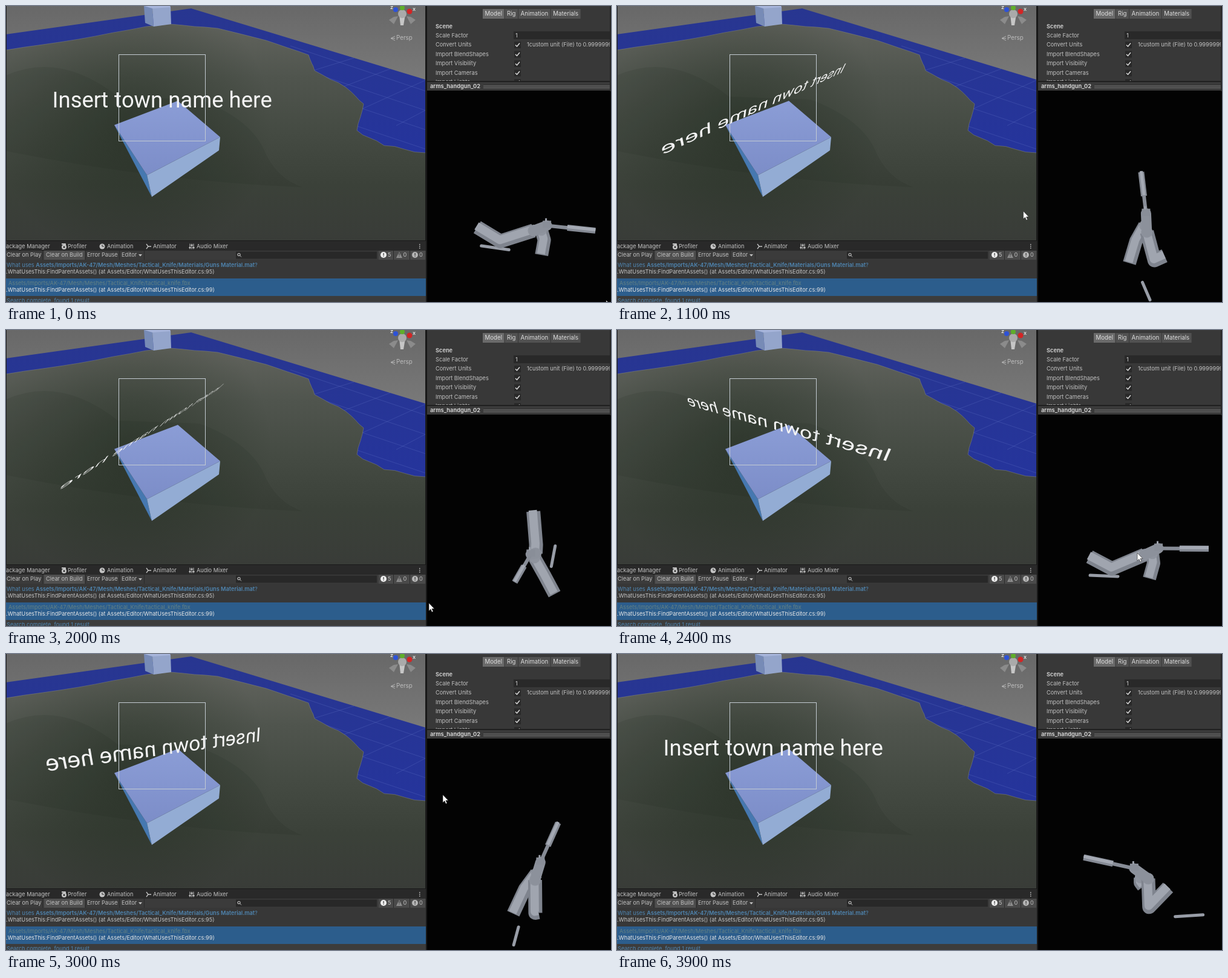
Animation, 1000 px wide and 490 px high, one loop 4 s. Source, as an HTML page with a canvas:

```html
<!DOCTYPE html>
<html lang="en">
<head>
<meta charset="utf-8">
<title>Editor with rotating label</title>
<style>
html, body { margin: 0; width: 100%; height: 100%; overflow: hidden; background: #191919; }
canvas { display: block; width: 100vw; height: 100vh; }
</style>
</head>
<body>
<canvas id="stage" width="1000" height="490"></canvas>
<script>
const W = 1000, H = 490, LOOP = 4000, STEP = 100;
const ctx = document.getElementById('stage').getContext('2d');
const backdrop = document.createElement('canvas');
backdrop.width = W;
backdrop.height = H;
let g = backdrop.getContext('2d');

const mix = (a, b, k) => a + (b - a) * k;
const mixAll = (a, b, k) => a.map((v, i) => mix(v, b[i], k));
const rad = deg => deg * Math.PI / 180;

// ---------- drawing helpers ----------
function rect(x, y, w, h, color) {
  g.fillStyle = color;
  g.fillRect(x, y, w, h);
}

function trace(pts) {
  g.beginPath();
  for (let i = 0; i < pts.length; i += 2) g.lineTo(pts[i], pts[i + 1]);
}

function poly(pts, color) {
  trace(pts);
  g.closePath();
  g.fillStyle = color;
  g.fill();
}

function line(pts, color, width = 1, cap = 'butt') {
  trace(pts);
  g.strokeStyle = color;
  g.lineWidth = width;
  g.lineCap = cap;
  g.lineJoin = 'round';
  g.stroke();
}

function dot(x, y, r, color) {
  g.beginPath();
  g.arc(x, y, r, 0, 7);
  g.fillStyle = color;
  g.fill();
}

function clipped(x, y, w, h, draw) {
  g.save();
  g.beginPath();
  g.rect(x, y, w, h);
  g.clip();
  draw();
  g.restore();
}

function label(text, x, y, color = '#c2c2c2', size = 9.2, weight = 400) {
  g.font = `${weight} ${size}px Inter, sans-serif`;
  g.textBaseline = 'middle';
  g.fillStyle = color;
  g.fillText(text, x, y);
  return x + g.measureText(text).width;
}

function gradient(y0, y1, ...colors) {
  const fill = g.createLinearGradient(0, y0, 0, y1);
  colors.forEach((c, i) => fill.addColorStop(i / (colors.length - 1), c));
  return fill;
}

let seed = 7;
function random() {
  seed = seed * 16807 % 2147483647;
  return seed / 2147483647 - 0.5;
}

// Splits each edge into short pieces with a little seeded jitter.
function rough(pts, amount) {
  const out = [];
  for (let i = 0; i + 3 < pts.length; i += 2)
    for (let k = 0; k < 1; k += 0.25) {
      const j = k ? amount : 0;
      out.push(mix(pts[i], pts[i + 2], k) + random() * j, mix(pts[i + 1], pts[i + 3], k) + random() * j);
    }
  return [...out, ...pts.slice(-2)];
}

// ---------- still parts ----------
function drawGizmo() {
  for (const side of [-1, 1])
    poly([655 + side * 7, 17, 655 + side * 14, 18, 655 + side * 22, 23, 655 + side * 14, 30], '#8b8b8b');
  poly([650, 14, 660, 14, 657, 32, 652, 32], '#c6c6c6');
  dot(655, 13, 7, '#aaaaaa');
  dot(655, 3, 4, '#5fae2a');
  dot(644, 6, 4, '#2d52d8');
  dot(667, 9, 4.5, '#d32525');
  label('z', 635, 2, '#e0e0e0', 9, 600);
  label('x', 672, 5, '#e0e0e0', 9, 600);
  line([643, 50, 636, 53.5, 643, 57], '#b4b4b4');
  line([636, 53.5, 643, 53.5], '#b4b4b4');
  label('Persp', 645, 53.5, '#bdbdbd', 9.8);
}

function drawWater() {
  poly([0, 47, 306, 4, 694, 122, 694, 250, 0, 90], gradient(0, 245, '#283690', '#25349c'));
  for (let i = 0; i < 5; i++) {
    const y = 66 + i * 32, x = 575 + i * 60;
    line([470, y, 694, y + 75], 'rgba(105,125,205,.35)', 0.8);
    line([x, 86 + i * 18, x - 110, 120 + i * 26], 'rgba(105,125,205,.35)', 0.8);
  }
}

function drawLand() {
  const shore = [
    ...rough([0, 73, 120, 55, 232, 34, 272, 30, 350, 37, 430, 57, 500, 81], 1),
    ...rough([500, 81, 510, 107, 562, 135, 591, 162, 580, 206, 625, 231, 694, 243], 4)
  ];
  const land = [...shore, 694, 388, 0, 388];
  poly(land, gradient(25, 388, '#62645e', '#50554e', '#454b43', '#3b4139', '#393c38'));
  line(shore, 'rgba(145,145,125,.45)');
  g.save();
  trace(land);
  g.clip();
  const shade = g.createRadialGradient(210, 195, 20, 210, 195, 230);
  shade.addColorStop(0, 'rgba(22,34,20,.4)');
  shade.addColorStop(1, 'rgba(22,34,20,0)');
  rect(0, 25, 694, 363, shade);
  g.beginPath();
  g.moveTo(320, 155);
  g.quadraticCurveTo(400, 185, 425, 235);
  g.quadraticCurveTo(445, 285, 490, 300);
  g.quadraticCurveTo(250, 290, 0, 240);
  g.lineTo(0, 115);
  g.quadraticCurveTo(90, 75, 185, 150);
  g.fillStyle = 'rgba(25,35,22,.1)';
  g.fill();
  g.restore();
}

function drawScene() {
  rect(0, 0, 694, 388, gradient(0, 130, '#686868', '#7a7a7a'));
  drawWater();
  drawLand();
  poly([228, 0, 242, 3, 244, 34, 230, 28], '#778bb6');
  poly([242, 3, 272, 1, 273, 30, 244, 34], '#94a5cb');
  poly([228, 0, 271, 0, 272, 2, 242, 4], '#a7b5db');

  poly([179, 197, 233, 280, 241, 316], '#4678b0');
  poly([233, 280, 354, 217, 352, 239, 241, 316], '#93acd4');
  poly([179, 197, 284, 157, 354, 217, 233, 280], gradient(157, 280, '#8b9dd6', '#7c8dc8'));
  drawGizmo();
}

function alertBadge(x, count, color) {
  dot(x, 412, 5, color);
  label('!', x - 1.3, 412.5, '#333333', 8, 700);
  label(count, x + 7, 412.5);
}

function drawTabs() {
  rect(0, 389, 694, 16, '#292929');
  label('ackage Manager', 0, 398);
  line([92, 394, 98, 394, 98, 400], '#c4c4c4', 2);
  dot(96, 399, 4, '#c4c4c4');
  dot(96, 399, 1.5, '#292929');
  label('Profiler', 102, 398);
  dot(159, 398, 4.5, '#c4c4c4');
  line([159, 395, 159, 398, 162, 398], '#292929');
  label('Animation', 167, 398);
  line([232, 394, 235, 398, 240, 398], '#c4c4c4', 1.3);
  line([232, 402, 235, 398], '#c4c4c4', 1.3);
  label('Animator', 243, 398);
  for (let i = 0; i < 3; i++) {
    const x = 304 + i * 3, y = i === 1 ? 396 : 400;
    line([x, 393.5, x, 402.5], '#c4c4c4');
    line([x - 1.5, y, x + 1.5, y], '#c4c4c4', 2);
    rect(683, 394 + i * 3, 1.5, 1.5, '#c4c4c4');
  }
  label('Audio Mixer', 315, 398);
}

function drawToolbar() {
  rect(0, 405, 694, 15, '#3b3b3b');
  rect(63, 405, 67, 15, '#505050');
  label('Clear on Play', 1, 412.5);
  label('Clear on Build', 66, 412.5);
  label('Error Pause', 134, 412.5);
  label('Editor', 191, 412.5);
  poly([219, 411, 225, 411, 222, 414.5], '#c2c2c2');
  rect(380, 406.5, 233, 12, '#282828');
  dot(385, 411.5, 2.6, '#c4c4c4');
  dot(385, 411.5, 1.5, '#282828');
  line([386.5, 413, 389, 415.5], '#c4c4c4');
  rect(616, 405, 77, 15, '#4a4a4a');
  for (const x of [60, 131, 187, 228, 640, 667]) rect(x, 405, 1, 15, '#2b2b2b');
  alertBadge(624, '5', '#eeeeee');
  poly([650, 407, 655, 417, 645, 417], '#8d8d8d');
  label('!', 648.8, 413, '#333333', 7, 700);
  label('0', 656.5, 412.5);
  alertBadge(676, '0', '#b5b5b5');
}

function drawLog() {
  const blue = '#4f86b2';
  const caller = '.WhatUsesThis:FindParentAssets() (at Assets/Editor/WhatUsesThisEditor.cs:';
  const root = 'Assets/Imports/AK-47/Mesh/Meshes/Tactical_Knife/';
  rect(0, 420, 694, 31, '#373737');
  const x = label('What uses ', 1, 429, blue);
  const end = label(root + 'Materials/Guns Material.mat', x, 429, blue, 9.2, 600);
  label('?', end, 429, blue);
  label(caller + '95)', 0, 440.5, '#c4c4c4');
  rect(0, 451, 694, 29, '#2c5d8c');
  label(root + 'tactical_knife.fbx', 4, 459, '#648183');
  label(caller + '99)', 0, 470.5, '#e6e6e6');
  rect(0, 480, 694, 10, '#3c3c3c');
  label('Search complete, found 1 result.', 1, 488, blue);
}

function drawInspector() {
  rect(696, 0, 304, 141, '#383838');
  let x = 788;
  for (const name of ['Model', 'Rig', 'Animation', 'Materials']) {
    g.font = '400 9.7px Inter, sans-serif';
    const w = g.measureText(name).width + 7;
    rect(x, 5, w, 16, x === 788 ? '#6a6a6a' : '#515151');
    label(name, x + 3.5, 13.5, '#dedede', 9.7);
    x += w + 1;
  }
  label('Scene', 710, 34, '#c8c8c8', 9.2, 700);
  rect(839, 42, 161, 13, '#292929');
  label('1', 842, 49, '#d0d0d0');
  label('Scale Factor', 710, 49);
  clipped(696, 0, 304, 125, () => {
    const rows = ['Convert Units', 'Import BlendShapes', 'Import Visibility', 'Import Cameras', 'Import Lights'];
    rows.forEach((name, i) => {
      const y = 64.5 + i * 15.5;
      label(name, 710, y);
      rect(840, y - 5.5, 11, 11, '#292929');
      line([842, y, 844.5, y + 2.5, 849, y - 3], '#d8d8d8', 1.5);
    });
    label('1custom unit (File) to 0.9999999', 861, 64.5);
  });
  rect(696, 124, 304, 2, '#202020');
  rect(696, 126, 304, 15, '#3a3a3a');
  label('arms_handgun_02', 701, 133.5, '#d0d0d0', 9.2, 700);
  rect(789, 132, 209, 1, '#777777');
  rect(789, 135, 209, 1, '#777777');
  rect(696, 140, 304, 350, '#030303');
  rect(998, 0, 2, 141, '#242424');
}

rect(0, 0, W, H, '#191919');
clipped(1, 0, 692, 388, drawScene);
drawTabs();
drawToolbar();
drawLog();
drawInspector();
g = ctx;

// ---------- motion ----------
// Each key: time, label turn and lean, model yaw, pointer x and y.
const keys = [
  [0, 0, 36, 8, 992, 487],
  [800, 177, 0, -50, 765, 352],
  [1500, 97, 36, -180, 547, 323],
  [2000, 133, 34, -262, 699, 452],
  [2400, 205, 8, -360, 860, 369],
  [3000, 167, -18, -440, 722, 233],
  [3900, 0, 36, -542, 1010, 495]
];

function stateAt(t) {
  const i = Math.max(1, keys.findIndex(k => k[0] >= t));
  const a = keys[i - 1], b = keys[i];
  const [, turn, lean, yaw, x, y] = mixAll(a, b, (t - a[0]) / (b[0] - a[0]));
  return { turn: rad(turn), lean: rad(lean), yaw: rad(yaw), x, y };
}

function limb(pts, width) {
  const p = pts.flat();
  line(p, '#7f848e', width);
  line(p.map((v, i) => v - (i % 2 ? 2 : 1)), '#a0a5af', width * 0.6);
  dot(...pts[2], width * 0.42, '#8f949e');
}

// Points are [right, screen height, towards the viewer] around the model's axis.
function drawArms(yaw) {
  const c = Math.cos(yaw), s = Math.sin(yaw);
  const fold = Math.max(0, -c);
  const turn = ([x, y, z]) => [875 + x * c - z * s, y + 0.7 * (x * s + z * c)];
  const bend = (open, folded) => turn(mixAll(open, folded, fold));
  const hand = turn([-3, 372, 0]);
  const rear = turn([20, 358, 5]);
  const muzzle = turn([103, 348, 20]);
  const neck = mixAll(rear, muzzle, 0.42);

  line([...turn([-93, 420, -20]), ...turn([-47, 422, -20])], '#989da7', 5, 'round');
  limb([bend([5, 438, -38], [5, 385, 0]), bend([12, 400, -20], [10, 378, 0]), turn([10, 370, 0])], 22);
  limb([bend([-94, 360, 22], [-35, 370, -25]), bend([-57, 388, 10], [-4, 405, -20]), hand], 23);
  line([...hand, ...rear], '#8c919b', 17, 'round');
  line([...rear, ...muzzle], '#878c96', 6);
  line([...neck, ...muzzle], '#858a94', 10);
  line([neck[0], neck[1] - 1.5, muzzle[0], muzzle[1] - 1.5], '#a5aab4', 5);
  rect(rear[0] - 7, rear[1] - 8, 14, 12, '#898e98');
  rect(rear[0] - 3, rear[1] - 12, 3, 5, '#9da2ac');
}

// Turns the text in space and draws it letter by letter in perspective.
function drawTitle(turn, lean) {
  const text = 'Insert town name here';
  const pitch = rad(36), c = Math.cos(turn), s = Math.sin(turn);
  const project = (x, h) => {
    const rise = h * Math.cos(lean), back = h * Math.sin(lean);
    const ground = x * s - back * c;
    const depth = ground * Math.cos(pitch) + rise * Math.sin(pitch);
    const zoom = 1 / (1 - depth * 0.0025);
    return [258 + zoom * (x * c + back * s),
      155 + zoom * (ground * Math.sin(pitch) - rise * Math.cos(pitch))];
  };
  g.font = '400 36.5px Roboto, sans-serif';
  g.textBaseline = 'alphabetic';
  g.fillStyle = '#f4f4f4';
  const half = g.measureText(text).width / 2;
  [...text].forEach((ch, i) => {
    const x = g.measureText(text.slice(0, i)).width - half;
    const w = g.measureText(ch).width;
    const o = project(x, -13), r = project(x + w, -13), u = project(x, 14);
    g.setTransform((r[0] - o[0]) / w, (r[1] - o[1]) / w,
      (o[0] - u[0]) / 27, (o[1] - u[1]) / 27, o[0], o[1]);
    g.fillText(ch, 0, 0);
  });
}

function drawPointer(x, y) {
  g.save();
  g.translate(x, y);
  const arrow = [0, 0, 0, 13, 3, 10.3, 5, 15, 7, 14, 5, 9.5, 9, 9.5];
  poly(arrow, '#ffffff');
  line([...arrow, 0, 0], '#222222', 0.6);
  g.restore();
}

const start = performance.now();
function frame() {
  const t = Math.floor((performance.now() - start) % LOOP / STEP) * STEP;
  const now = stateAt(t);
  g.drawImage(backdrop, 0, 0);
  clipped(1, 0, 692, 388, () => drawTitle(now.turn, now.lean));
  g.strokeStyle = '#c3cbd2';
  g.lineWidth = 1;
  g.strokeRect(186.5, 80.5, 143, 143);
  clipped(696, 141, 304, 349, () => drawArms(now.yaw));
  drawPointer(now.x, now.y);
  requestAnimationFrame(frame);
}
frame();
</script>
</body>
</html>
```
